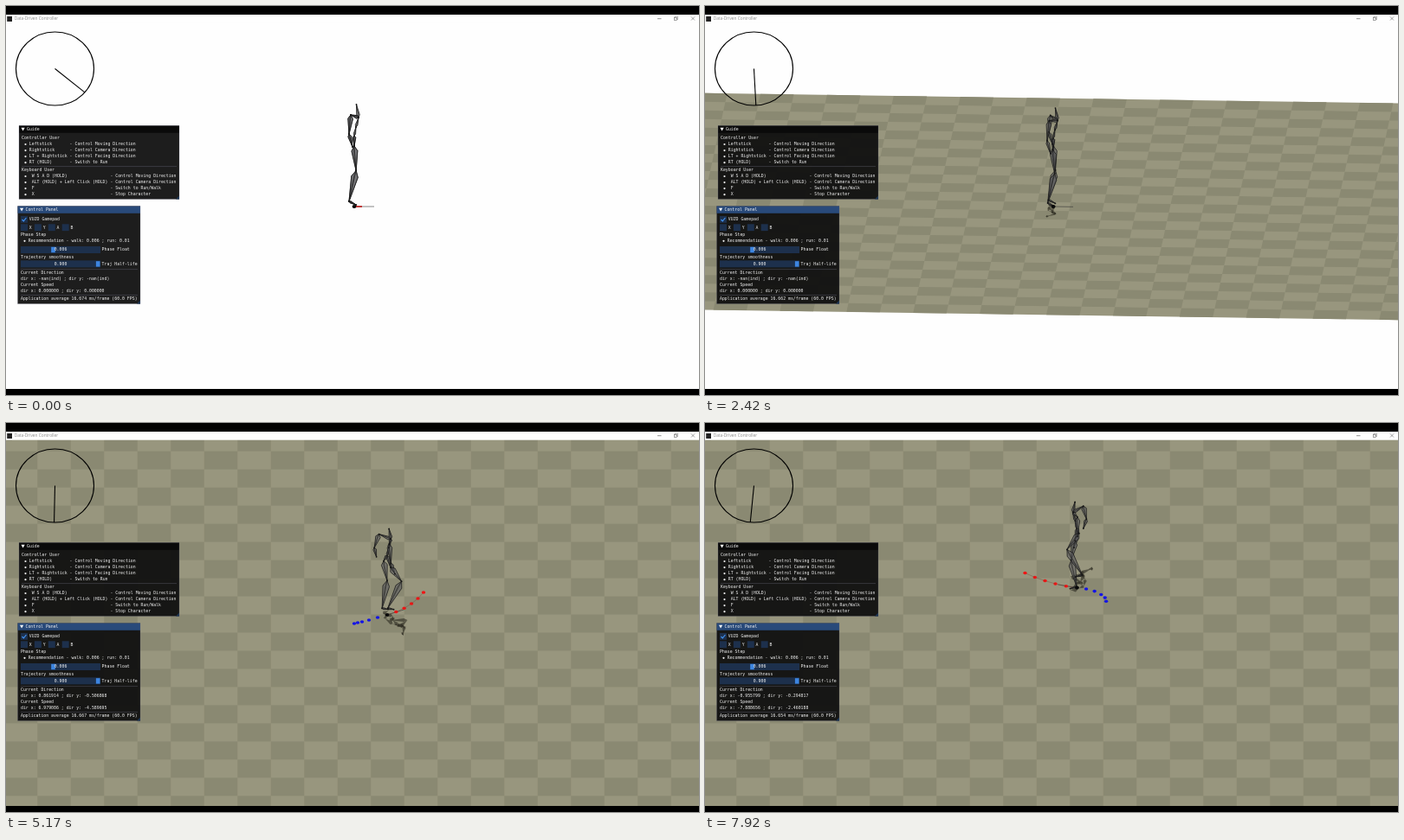
Recreate the animation shown at these times as an HTML page with a canvas. Size 800x450 px, loop 8000 ms.

```html
<!DOCTYPE html>
<html lang="en">
<head>
<meta charset="utf-8">
<title>Data-Driven Controller</title>
<style>
html, body { margin: 0; width: 100%; height: 100%; overflow: hidden; background: #000; }
canvas { display: block; width: 100vw; height: 100vh; }
</style>
</head>
<body>
<canvas id="stage" width="800" height="450"></canvas>
<script>
const ctx = document.getElementById('stage').getContext('2d');
const LOOP = 8000, FRAME = 250 / 3, RAD = Math.PI / 180;
const ORIGIN = { x: 402, y: 232 };
const TILE = 38.5, HALF_TILES = 12, FINAL_TILT = 0.545;
const MONO = '"DejaVu Sans Mono", monospace', SANS = '"Open Sans", sans-serif';

// Rows are [seconds, ...values]
const CAMERA = [[1.95, 0, 0], [2.08, 3.46, 0], [2.5, 17.8, 4], [2.75, 24.4, 7.2],
  [3.2, 29, 7.4], [3.83, 30.3, 7], [4.2, 31, 5.5], [4.95, 33.03, 0]];
const FACING = [[3.4, 0], [3.83, -12], [5.17, -30], [6.33, -88], [7.92, -163]];
const DIRECTION = [[3.4, 1, 0], [3.83, 0.917434, -0.397819], [5.17, 0.861914, -0.506868],
  [6.33, 0.059715, -0.998218], [7.92, -0.955799, -0.294817]];
const SPEED = [[3.4, 0, 0], [3.83, 3.615914, -1.664388], [5.17, 6.979086, -4.589695],
  [6.33, -1.065105, -6.292892], [7.92, -7.888656, -2.460188]];
const FRAME_MS = [[0, 16.674], [2.08, 16.66], [2.75, 16.664], [3.83, 16.656],
  [5.17, 16.667], [6.33, 16.653], [7.92, 16.654]];
// Control and end offset of the predicted curve
const FORECAST = [[3.4, 0, 0, 0, 0], [3.83, 25, -4, 51, -9], [5.17, 27, -7.6, 42, -26],
  [6.33, -4, -11, -36, -21], [7.92, -32, -4, -60, -17]];
const STEP = 0.32;
const PATH = [[0, 0], [4, -1], [9, -2], [17, -4], [27, -7], [38, -10], [48, -13.5], [55.5, -18],
  [60.5, -23], [61.5, -27.5], [58.5, -31.5], [53, -35], [44, -39], [34, -40.5], [23, -42]]
  .map(([x, y], i) => [3.57 + i * STEP, x, y / FINAL_TILT]);

function sample(keys, t) {
  const next = keys.findIndex(k => k[0] > t);
  if (next === 0) return keys[0].slice(1);
  if (next < 0) return keys[keys.length - 1].slice(1);
  const a = keys[next - 1], b = keys[next], u = (t - a[0]) / (b[0] - a[0]);
  return a.slice(1).map((v, i) => v + (b[i + 1] - v) * u);
}

function makeView(t) {
  const [pitch, yaw] = sample(CAMERA, t);
  return { tilt: Math.sin(pitch * RAD), rise: Math.cos(pitch * RAD),
    c: Math.cos(yaw * RAD), s: Math.sin(yaw * RAD) };
}

const project = (v, x, y, h = 0) => [
  ORIGIN.x + x * v.c - y * v.s,
  ORIGIN.y + (x * v.s + y * v.c) * v.tilt - h * v.rise];

function line(x1, y1, x2, y2, color, width) {
  ctx.strokeStyle = color;
  ctx.lineWidth = width;
  ctx.beginPath();
  ctx.moveTo(x1, y1);
  ctx.lineTo(x2, y2);
  ctx.stroke();
}

function polygon(points, fill, stroke, width) {
  ctx.beginPath();
  points.forEach(p => ctx.lineTo(...p));
  ctx.closePath();
  if (fill) { ctx.fillStyle = fill; ctx.fill(); }
  if (stroke) { ctx.strokeStyle = stroke; ctx.lineWidth = width; ctx.stroke(); }
}

function rect(x1, y1, x2, y2, color) {
  ctx.fillStyle = color;
  ctx.fillRect(x1, y1, x2 - x1, y2 - y1);
}

function dot(x, y, r, color, flat = 1) {
  ctx.fillStyle = color;
  ctx.beginPath();
  ctx.ellipse(x, y, r, r * flat, 0, 0, 7);
  ctx.fill();
}

// Large type scaled down keeps the advances of small text exact.
function text(str, x, y, { color = '#f2f2f2', size = 4.86, family = MONO, align = 'left' } = {}) {
  ctx.save();
  ctx.translate(x, y);
  ctx.scale(0.1, 0.1);
  ctx.font = `${size * 10}px ${family}`;
  ctx.textAlign = align;
  ctx.textBaseline = 'middle';
  ctx.fillStyle = color;
  ctx.fillText(str, 0, 0);
  ctx.restore();
}

function drawGround(v) {
  if (v.tilt < 0.002) return;
  const half = (HALF_TILES + 0.5) * TILE;
  ctx.save();
  ctx.transform(v.c, v.s * v.tilt, -v.s, v.c * v.tilt, ORIGIN.x, ORIGIN.y);
  rect(-half, -half, half, half, '#98967e');
  ctx.fillStyle = '#8a8972';
  for (let i = -HALF_TILES; i <= HALF_TILES; i++)
    for (let j = -HALF_TILES; j <= HALF_TILES; j++)
      if ((i + j) % 2) ctx.fillRect((i - 0.5) * TILE, (j - 0.5) * TILE, TILE, TILE);
  ctx.restore();
}

// Joints are [forward, right, height]; returns pairs of joints.
function buildBones(phase, walk) {
  const pelvis = [0, 0, 82], spine = [2, 0, 92], chest = [5, 0, 103], head = [2.5, 0, 118];
  const bones = [[pelvis, spine], [spine, chest], [chest, head]];
  for (const side of [-1, 1]) {
    const a = side > 0 ? phase : phase + Math.PI;
    const swing = Math.cos(a) * walk, lift = Math.max(0, Math.sin(a)) * walk;

    const shoulder = [-4, side * 12, 106];
    const elbow = [-6 - swing * 4, side * 19, 84];
    const wrist = [-2 - swing * 8, side * 21, 69];
    bones.push([chest, shoulder], [shoulder, elbow], [elbow, wrist]);

    const hip = [0, side * 8, 70];
    const ankle = [-6 + 3 * walk + swing * 13, side * 7, 6 + lift * 8];
    const toe = [ankle[0] + 8, side * 7, ankle[2] - 4];
    const df = ankle[0], dh = ankle[2] - 70, reach = Math.hypot(df, dh);
    const thigh = 28.5, shin = 36.5;
    const along = Math.min(thigh, (thigh ** 2 - shin ** 2 + reach ** 2) / (2 * reach));
    const bend = Math.sqrt(thigh ** 2 - along ** 2);
    const knee = [(df * along - dh * bend) / reach, side * 7.5,
      70 + (dh * along + df * bend) / reach];
    bones.push([pelvis, hip], [hip, knee], [knee, ankle], [ankle, toe]);
  }
  return bones;
}

function drawBone(p, q, half, fill, stroke) {
  const dx = q[0] - p[0], dy = q[1] - p[1], len = Math.hypot(dx, dy) || 1;
  const nx = -dy / len * half, ny = dx / len * half;
  const mx = p[0] + dx * 0.2, my = p[1] + dy * 0.2;
  polygon([p, [mx + nx, my + ny], q, [mx - nx, my - ny]], fill, stroke, 0.8);
  if (stroke) polygon([p, [mx + nx * 0.25, my + ny * 0.25], q], null, stroke, 0.5);
}

function drawCharacter(v, t, phase) {
  const [rx, ry] = sample(PATH, t);
  const facing = sample(FACING, t)[0] * RAD, c = Math.cos(facing), s = Math.sin(facing);
  const local = (f, r, h) => project(v, rx + f * c - r * s, ry + f * s + r * c, h);
  const walk = Math.min(1, Math.max(0, (t - 3.45) / 0.6));
  const bones = buildBones(phase, walk);
  const root = local(0, 0, 0);

  if (v.tilt > 0.01) {
    const cast = ([f, r, h]) => local(f, r + h * 0.3, 0);
    for (const [p, q] of bones)
      drawBone(cast(p), cast(q), 3.2 * v.tilt + 0.3, 'rgba(45,44,34,.62)');
  }

  line(...root, ...local(23, 0, 0), '#333', 0.6);
  if (t < 1.95) line(...root, ...local(9, 0, 0), '#c01818', 1.6);
  drawTrajectory(v, t, root);

  for (const [p, q] of bones) {
    const length = Math.hypot(p[0] - q[0], p[1] - q[1], p[2] - q[2]);
    drawBone(local(...p), local(...q), Math.min(3.8, length * 0.12), 'rgba(95,95,98,.62)', '#1c1c1c');
  }
  for (const [, q] of bones) dot(...local(...q), 0.9, '#151515');
  dot(...root, 2.4, '#0a0a0a', 0.85);
}

function drawTrajectory(v, t, root) {
  if (t < 3.4) return;
  const [cx, cy, ex, ey] = sample(FORECAST, t);
  let last = root;
  for (let k = 1; k <= 5; k++) {
    const past = project(v, ...sample(PATH, t - k * STEP));
    dot(...past, 2.2, '#1414e6', 0.8);
    const u = k / 5, b = 2 * u * (1 - u);
    const next = [root[0] + b * cx + u * u * ex, root[1] + b * cy + u * u * ey];
    line(...last, ...next, 'rgba(110,60,50,.7)', 0.5);
    dot(...next, 2.2, '#f01414', 0.8);
    last = next;
  }
}

function drawPhase(angle) {
  ctx.strokeStyle = '#000';
  ctx.lineWidth = 1.1;
  ctx.beginPath();
  ctx.ellipse(56.5, 72.5, 45, 42.5, 0, 0, 7);
  ctx.stroke();
  line(56.5, 72.5, 56.5 + 45 * Math.cos(angle), 72.5 + 42.5 * Math.sin(angle), '#000', 1.1);
}

function drawPanel(x1, y1, x2, y2, title, barColor) {
  rect(x1, y1, x2, y2, 'rgba(15,15,15,.94)');
  rect(x1, y1, x2, y1 + 8.3, barColor);
  ctx.strokeStyle = 'rgba(110,110,128,.5)';
  ctx.lineWidth = 0.5;
  ctx.strokeRect(x1, y1, x2 - x1, y2 - y1);
  polygon([[x1 + 2.5, y1 + 2.3], [x1 + 6.7, y1 + 2.3], [x1 + 4.6, y1 + 6]], '#fff');
  polygon([[x2, y2 - 4], [x2, y2], [x2 - 4, y2]], '#1d3554');
  text(title, x1 + 9, y1 + 4.2);
}

function bullet(x, y, str, gap) {
  dot(x, y, 1.1, '#f2f2f2');
  text(str, x + gap, y);
}

const separator = (x1, x2, y) => line(x1, y, x2, y, 'rgba(110,110,128,.6)', 0.6);

function drawGuide() {
  drawPanel(15, 138.5, 200, 223.5, 'Guide', '#0a0a0a');
  text('Controller User', 18, 153);
  [['Leftstick', 'Control Moving Direction'], ['Rightstick', 'Control Camera Direction'],
    ['LT + Rightstick', 'Control Facing Direction'], ['RT (HOLD)', 'Switch to Run']]
    .forEach(([key, use], i) => bullet(22.5, 160 + i * 7.05, `${key.padEnd(16)}- ${use}`, 4.3));
  separator(18, 197, 185.6);
  text('Keyboard User', 18, 190);
  [['W S A D (HOLD)', 'Control Moving Direction'],
    ['ALT (HOLD) + Left Click (HOLD)', 'Control Camera Direction'],
    ['F', 'Switch to Run/Walk'], ['X', 'Stop Character']]
    .forEach(([key, use], i) => bullet(22.5, 197 + i * 7.05, `${key.padEnd(31)}- ${use}`, 7.2));
}

function checkbox(x, y, label, checked) {
  rect(x, y, x + 8, y + 7.8, '#1d304c');
  if (checked) {
    ctx.lineJoin = 'miter';
    ctx.strokeStyle = '#4296fa';
    ctx.lineWidth = 1.1;
    ctx.beginPath();
    ctx.moveTo(x + 1.6, y + 4);
    ctx.lineTo(x + 3.3, y + 5.8);
    ctx.lineTo(x + 6.4, y + 2);
    ctx.stroke();
  }
  text(label, x + 9.8, y + 4);
}

function slider(y, value, label, grab) {
  rect(17, y, 109, y + 8, '#1d304c');
  rect(grab, y + 0.8, grab + 4.6, y + 7.2, '#3d85e0');
  text(value, 63, y + 4, { align: 'center' });
  text(label, 110.6, y + 4);
}

function drawControls(t) {
  const pair = ([x, y]) => `dir x: ${x.toFixed(6)} ; dir y: ${y.toFixed(6)}`;
  drawPanel(13.5, 231.5, 155, 344.5, 'Control Panel', '#294a7a');
  checkbox(17, 243, 'VUZO Gamepad', true);
  ['X', 'Y', 'A', 'B'].forEach((name, i) => checkbox(17 + i * 15.9, 252.3, name));
  text('Phase Step', 17, 265);
  bullet(21.5, 271.8, 'Recommendation - walk: 0.006 ; run: 0.01', 4.2);
  slider(278, '0.006', 'Phase Float', 52.2);
  text('Trajectory smoothness', 17, 290.4);
  slider(294.4, '0.900', 'Traj Half-life', 103.9);
  separator(17, 152, 304.6);
  text('Current Direction', 17, 309);
  text(t < 3.4 ? 'dir x: -nan(ind) ; dir y: -nan(ind)' : pair(sample(DIRECTION, t)), 17, 316);
  text('Current Speed', 17, 323);
  text(pair(sample(SPEED, t)), 17, 330);
  separator(17, 152, 334.4);
  text(`Application average ${sample(FRAME_MS, t)[0].toFixed(3)} ms/frame (60.0 FPS)`, 17, 339);
}

function drawWindow() {
  rect(0, 10, 800, 19.7, '#fefefe');
  rect(0, 0, 800, 10, '#000');
  rect(0, 443, 800, 450, '#000');
  rect(1.2, 12, 7, 18, '#222');
  text('Data-Driven Controller', 9.7, 14.9, { color: '#8a8a8a', size: 4.8, family: SANS });
  const ink = '#666';
  line(752, 14.7, 756.5, 14.7, ink, 0.7);
  ctx.lineWidth = 0.6;
  ctx.strokeRect(771.3, 13.2, 3.3, 3.3);
  polygon([[772.3, 13], [772.3, 12.2], [775.6, 12.2], [775.6, 15.5], [774.8, 15.5]], null, ink, 0.4);
  line(791, 12.5, 795, 16.5, ink, 0.6);
  line(795, 12.5, 791, 16.5, ink, 0.6);
}

function render(ms) {
  const index = Math.floor((ms % LOOP + 5) / FRAME) % 96;
  const t = Math.round(index * 25 / 3) / 100;
  const phase = (40.2 - 129.4 * t) * RAD;
  const view = makeView(t);
  rect(0, 0, 800, 450, '#fefefe');
  ctx.lineJoin = 'round';
  drawGround(view);
  drawCharacter(view, t, phase);
  drawPhase(phase);
  drawGuide();
  drawControls(t);
  drawWindow();
}

const start = performance.now();
function tick() {
  render(performance.now() - start);
  requestAnimationFrame(tick);
}
tick();
</script>
</body>
</html>
```
